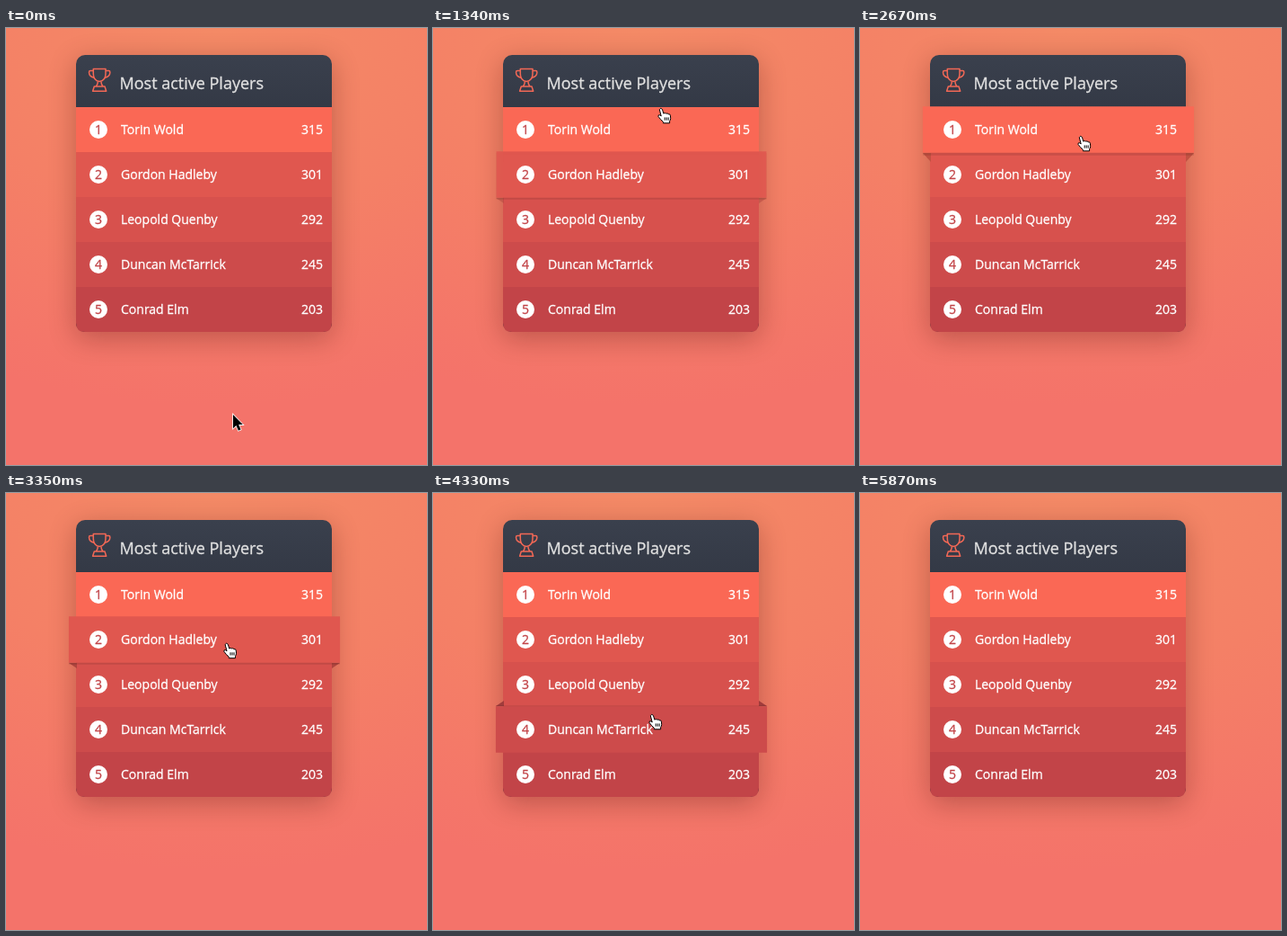
An HTML page for the animation above (6400 ms loop, 469 by 486 pixels).

```html
<!DOCTYPE html>
<html lang="en">
<head>
<meta charset="utf-8">
<title>Leaderboard</title>
<style>
html, body { margin: 0; width: 100%; height: 100%; overflow: hidden; }
body { background: radial-gradient(600px 420px at 235px 0, #f48a66, #f48066 50%, #f4736a); }
svg { position: absolute; left: 0; top: 0; cursor: default; }
.card {
  position: absolute; left: 78px; top: 30px; width: 285px; height: 308px;
  border-radius: 10px; background: linear-gradient(#3a404d, #181c26);
  box-shadow: 0 7px 30px rgba(62, 9, 11, .3);
}
text { font: 14px "Open Sans", sans-serif; fill: #fff; stroke: #fff; stroke-width: .3px; }
.title { font-size: 18px; fill: #e1e1e1; stroke: #e1e1e1; }
.rank { fill: #c24448; stroke: #c24448; text-anchor: middle; }
.score { text-anchor: end; }
</style>
</head>
<body>
<div class="card"></div>
<svg width="469" height="486" viewBox="0 0 469 486">
  <g fill="none" stroke="#f26856" stroke-width="1.5" stroke-linejoin="round">
    <path d="M97.3 45.6H111V51C111 55.6 108.6 58.8 104.1 59.6C99.6 58.8 97.3 55.6 97.3 51Z"/>
    <path d="M97.3 47.6H94Q92.5 47.6 92.5 49.2Q92.6 54.2 98.4 55.2M111 47.6H114.4Q115.9 47.6 115.9 49.2Q115.8 54.2 109.9 55.2"/>
    <path d="M102.3 59.6Q102.4 63 100.2 65M106 59.6Q105.9 63 108.1 65M98.3 65H110L111.7 70.2H96.6Z"/>
  </g>
  <text class="title" x="126.5" y="68">Most active Players</text>
  <g id="rows"></g>
  <g id="wings"></g>
  <g id="labels"></g>
  <path id="arrow" d="M0 0V15.2L3.4 12.1L5.9 17.8L8.6 16.6L6.1 11.1H10.8Z" fill="#000" stroke="#fff" stroke-width="1.6" paint-order="stroke"/>
  <path id="hand" d="M-1.7 1.6Q-.2-.9 1.4 1.4L2.9 6.2Q4.4 4.7 5.6 6.2Q7.2 5.1 8.1 6.8Q10 6.2 10.4 8.2L10.7 11.4Q10.6 13.2 9.6 14.6V16.8H2.4V15.4Q-.6 12.8-3 9.4Q-3.4 7.2-1.2 7.8L.2 9Z M4.2 10.4V13.6M6.2 10.4V13.6M8.2 10.4V13.6" fill="#fff" stroke="#000" stroke-linejoin="round"/>
</svg>
<script>
const LOOP = 6400, LEFT = 78, WIDTH = 285, TOP = 88, H = 50, COUNT = 5;
const AXIS = 221, REACH = 151; // centre and half width of a raised row
const $ = id => document.getElementById(id);

const players = [
  { name: "Torin Wold", score: 315, color: "#fa6855" },
  { name: "Gordon Hadleby", score: 301, color: "#e0574f" },
  { name: "Leopold Quenby", score: 292, color: "#d7514d" },
  { name: "Duncan McTarrick", score: 245, color: "#cd4b4b" },
  { name: "Conrad Elm", score: 203, color: "#c24448" }
];

// Pointer moves: start time, end time, destination
const home = [253, 430];
const moves = [
  [540, 750, 221, 186], [750, 1040, 234, 172], [1260, 1320, 254, 89], [1890, 2050, 253, 52],
  [2050, 2320, 250, 104], [2550, 2670, 246, 120], [2840, 3080, 246, 162], [3300, 3500, 245, 192],
  [3500, 3850, 244, 246], [4480, 4930, 246, 305], [5410, 5800, 255, 490]
];

const clamp = v => Math.min(1, Math.max(0, v));
const ease = v => { v = clamp(v); return v * v * (3 - 2 * v); };

function pointer(t) {
  let [x, y] = home;
  for (const [from, to, x1, y1] of moves) {
    const k = ease((t - from) / (to - from));
    x += (x1 - x) * k;
    y += (y1 - y) * k;
  }
  return [x, y];
}

const rowAt = y => Math.floor((y - TOP) / H);
const isRow = i => i >= 0 && i < COUNT;

// Stretches of time during which the pointer stays on one row
const visits = [];
for (let t = 0, last = -1; t < LOOP; t += 5) {
  const row = rowAt(pointer(t)[1]);
  if (row !== last) visits.push({ row, from: t, to: t });
  visits[visits.length - 1].to = t + 5;
  last = row;
}

// Hover strength of a row, with separate fade-in and fade-out times
function hover(row, t, fadeIn, fadeOut) {
  return Math.max(0, ...visits.filter(v => v.row === row && t >= v.from).map(({ from, to }) => {
    const peak = ease((Math.min(t, to) - from) / fadeIn);
    return t > to ? peak * (1 - ease((t - to) / (fadeOut * peak))) : peak;
  }));
}

function rowPath(y, last) {
  const r = last ? 10 : 0;
  return `M${LEFT} ${y}h${WIDTH}v${H - r}q0 ${r} ${-r} ${r}h${2 * r - WIDTH}q${-r} 0 ${-r} ${-r}z`;
}

players.forEach((p, i) => {
  const y = TOP + i * H, mid = y + H / 2, d = rowPath(y, i === COUNT - 1);
  // Upper rows fold their corners down, lower rows fold them up
  const down = i < 3;
  const ear = down ? 10 - 4 * i : -2 * i;
  const shade = down ? 3 - i : 2 - i;
  const base = down ? y + H + 1 : y - 1;
  const corner = side => `M${AXIS + side * REACH} ${base}h${-9 * side}v${ear}z`;
  $("rows").innerHTML += `<path d="${d}" fill="${p.color}"/>`;
  $("wings").innerHTML += `<g>
    <path d="${corner(-1)}${corner(1)}" style="fill: color-mix(in srgb, ${p.color}, #000 22%)"/>
    <g><path d="${d}" transform="translate(0 ${shade})" fill-opacity=".1"/>
    <path d="${d}" fill="${p.color}"/></g></g>`;
  $("labels").innerHTML += `<circle cx="103" cy="${mid}" r="10" fill="#fff"/>
    <text class="rank" x="103" y="${mid + 5}">${i + 1}</text>
    <text x="128" y="${mid + 5}">${p.name}</text>
    <text class="score" x="353" y="${mid + 5}">${p.score}</text>`;
});

function draw(t) {
  players.forEach((p, i) => {
    const [ears, wing] = $("wings").children[i].children;
    const k = hover(i, t, 300, 300), cy = TOP + (i + .5) * H;
    wing.setAttribute("opacity", k);
    wing.setAttribute("transform",
      `translate(${AXIS} ${cy}) scale(${1 + .06 * k} ${1 + .03 * k}) translate(${-LEFT - WIDTH / 2} ${-cy})`);
    ears.setAttribute("opacity", hover(i, t, 350, 100));
  });

  const [x, y] = pointer(t), onRow = isRow(rowAt(y));
  for (const [id, shown] of [["arrow", !onRow], ["hand", onRow]]) {
    $(id).setAttribute("transform", `translate(${x} ${y})`);
    $(id).setAttribute("visibility", shown ? "visible" : "hidden");
  }
}

const start = performance.now();
function frame() {
  draw((performance.now() - start) % LOOP);
  requestAnimationFrame(frame);
}
frame();
</script>
</body>
</html>
```
